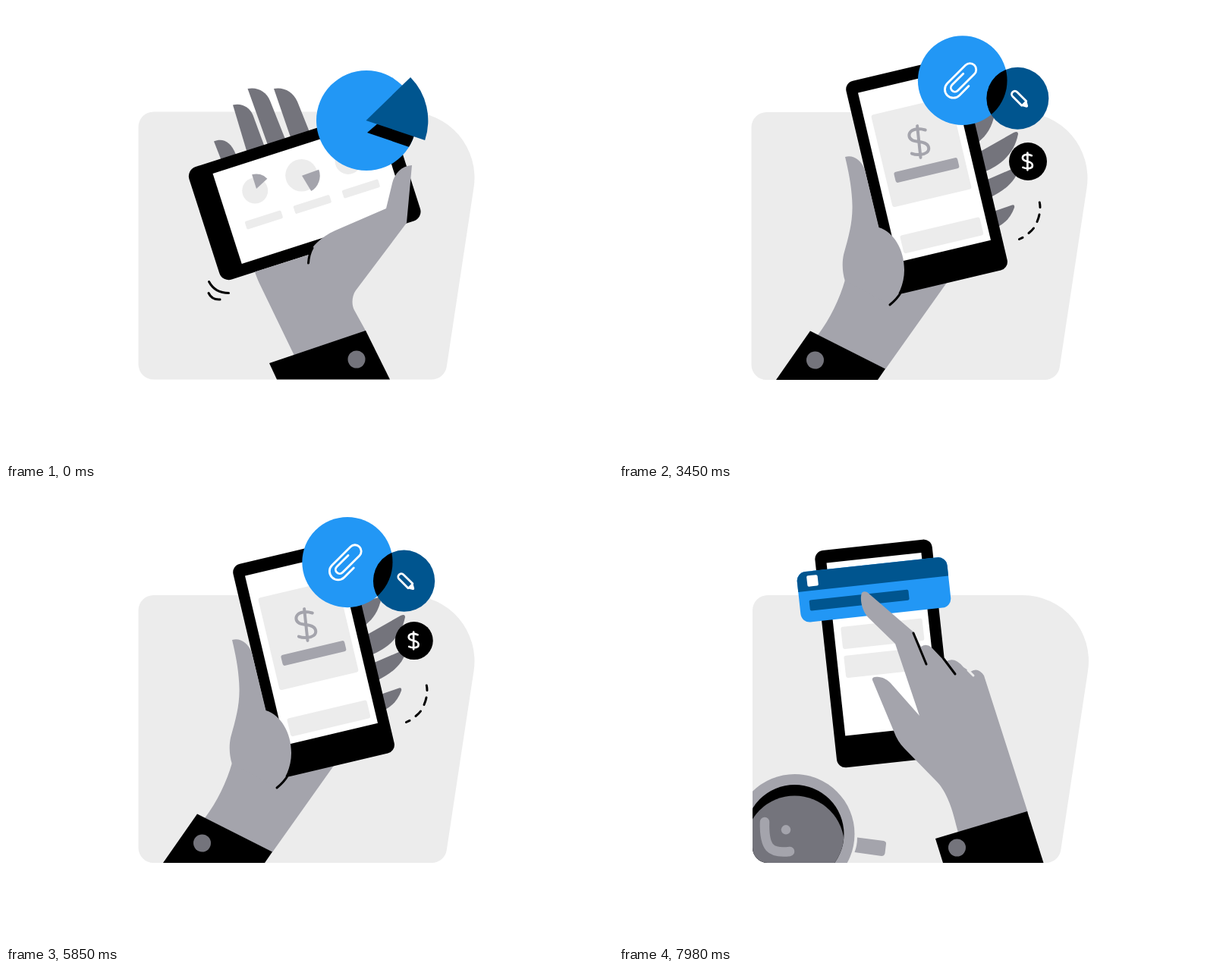
Recreate the animation shown at these times as an HTML page. Size 800 by 600 pixels, loop 8 s.

```html
<!DOCTYPE html>
<html lang="en">
<head>
<meta charset="utf-8">
<title>Hands and phones</title>
<style>
  html, body { margin: 0; width: 100%; height: 100%; overflow: hidden; background: #fff; }
  svg { display: block; width: 100%; height: 100%; }
  .line { fill: none; stroke: #000; stroke-width: 3; stroke-linecap: round; stroke-linejoin: round; }
  .icon { fill: none; stroke: #fff; stroke-width: 2.8; stroke-linecap: round; stroke-linejoin: round; }
  .pale { fill: #ececec; }
  .skin { fill: #a4a4ac; }
  .dark { fill: #74747c; }
  .blue { fill: #2297f5; }
  .navy { fill: #00558f; }
  .white { fill: #fff; }
  #shine { stroke: #a4a4ac; stroke-width: 12.5; }
</style>
</head>
<body>
<svg viewBox="0 0 800 600">
  <defs>
    <path id="plate" d="M194.5 139.5H530.5A87 87 0 0 1 616.5 239.6L580.8 475.5A20 20 0 0 1 561 492.5H194.5A20 20 0 0 1 174.5 472.5V159.5A20 20 0 0 1 194.5 139.5Z"/>
    <g id="phone">
      <rect x="-14.6" y="-17" width="155.3" height="288" rx="11.5"/>
      <rect class="white" width="125.6" height="229.4"/>
    </g>
    <path id="dollar" d="M10 -14.5C5 -16.5 2 -17 -1 -17C-8 -17 -12 -13.5 -12 -9C-12 -3 -6 -1.5 0 0C7 1.5 12 4 12 9.5C12 14.5 7 17 0 17C-4 17 -7 16.5 -11 14.5M0 -21V21"/>
    <clipPath id="pieClip"><circle id="pieClipDisc"/></clipPath>
    <clipPath id="bubbleClip"><circle id="bubbleClipDisc"/></clipPath>
    <clipPath id="cupClip"><use href="#plate" x="1.5" y=".5"/></clipPath>
    <clipPath id="drinkClip"><circle cx="231.5" cy="455" r="65"/></clipPath>
  </defs>

  <g id="scene0">
    <use href="#plate" class="pale"/>
    <g class="dark">
      <path d="M274 178.5C284 174 296 177 303 196L284 204Z"/>
      <path d="M299 130.5C310 127.5 321 133 325.5 144L341 186L318 194Z"/>
      <path d="M318.5 109C332 106.500 343 113 348 125L369 178L346 186Z"/>
      <path d="M353 109C366 106.5 378 113 384 126L400 166L376 176Z"/>
    </g>
    <g transform="translate(237.5 216) rotate(-17.8)">
      <rect width="278" height="156" rx="13"/>
      <rect class="white" x="31.8" y="15.5" width="228" height="125"/>
      <g class="pale">
        <rect x="52.3" y="88.7" width="50" height="11" rx="2"/>
        <rect x="119.4" y="88.7" width="50" height="11" rx="2"/>
        <rect x="186.7" y="88.7" width="50" height="11" rx="2"/>
      </g>
    </g>
    <circle id="mini1" class="pale"/>
    <circle id="mini2" class="pale"/>
    <circle id="mini3" class="pale"/>
    <path id="slice1" class="skin"/>
    <path id="slice2" class="skin"/>
    <path class="skin" d="M535 210C521 211 512 221 509 234L501 267L434 296C414 305 402 318 399.5 328L328 350.5C330 357 333 364 337 372L380 461L475 430L459 401C455 393 456 382 461 375L528 286Z"/>
    <path class="line" d="M398.5 339C399 331 400.5 325 404 319"/>
    <path d="M347 471L474 428L506 492.5H357Z"/>
    <circle class="dark" cx="462" cy="466" r="11.5"/>
    <path class="line" d="M267.5 363.5C273 374 282 378.5 293.5 378.5M267 378.5C270 385 275 387.5 282 387"/>
    <circle id="pie" class="blue"/>
    <path id="hole" clip-path="url(#pieClip)"/>
    <path id="slice" class="navy"/>
  </g>

  <g id="scene1">
    <use href="#plate" y=".5" class="pale"/>
    <g class="dark">
      <path d="M465 150L495 142C492 160 484 171 474 179Z"/>
      <path d="M476 192L520 167Q526 164 526 169C521 194 505 209 480 219.500Z"/>
      <path d="M483 230L527 211C526 229 508 244 488 253Z"/>
      <path d="M495 270.5L518 262.5Q522 261.500 521 266C517 277 510 286 498 292Z"/>
    </g>
    <path class="skin" d="M298 361C291 386 278 413 262 434L351 479L434 362L370 330Z"/>
    <g transform="translate(315 114.5) rotate(-13.3)">
      <use href="#phone"/>
      <rect class="pale" x="9.8" y="32.6" width="107" height="125" rx="3"/>
      <rect class="skin" x="21.5" y="112.8" width="86" height="14.5" rx="3"/>
      <rect class="pale" x="10.2" y="196" width="108" height="24.5" rx="3"/>
    </g>
    <use href="#dollar" transform="translate(395.3 179) rotate(-6)" class="line" style="stroke:#a4a4ac;stroke-width:4"/>
    <path class="skin" d="M298 199C309 196 319 203 324 216L342.5 292C362 298 376 321 376 348C376 367 368 384 357 394L298 363C294 350 294 338 296 328C303 303 308 285 307.5 263C307 240 303 220 298 199Z"/>
    <path class="line" d="M357 394Q366 387 372 377"/>
    <path d="M252 428.5L351 478.5L341 493H207Z"/>
    <circle class="dark" cx="258.5" cy="467" r="11.5"/>
    <path class="line" d="M527.5 307.5L532 305.3M540 299.5Q544 296.5 546.5 293M551 284.5Q553 280 554 275M555 265.5Q555 262 554.3 259"/>
    <circle id="big" class="blue"/>
    <circle id="mid" class="navy"/>
    <circle id="overlap" clip-path="url(#bubbleClip)"/>
    <circle id="small"/>
    <path id="clip" class="icon" d="M13 -1.5V16A11.25 11.25 0 0 1 -9.5 16V-18A8.25 8.25 0 0 1 7 -18V13A5.35 5.35 0 0 1 -3.7 13V-8"/>
    <g id="pen">
      <path class="icon" d="M-4.2 9V-8A4.2 4.2 0 0 1 4.2 -8V9"/>
      <path class="white" d="M-5.5 8H5.5L1.5 15Q0 17 -1.5 15Z"/>
    </g>
    <use id="cash" href="#dollar" class="icon" style="stroke-width:5"/>
  </g>

  <g id="scene2">
    <use href="#plate" x="1.5" y=".5" class="pale"/>
    <g clip-path="url(#cupClip)">
      <circle class="skin" cx="231.5" cy="455" r="79"/>
      <circle cx="231.5" cy="455" r="65"/>
      <circle class="dark" cx="231.5" cy="470" r="65.5" clip-path="url(#drinkClip)"/>
      <path id="shine" class="line"/>
      <circle id="dot" class="skin" r="6.2"/>
    </g>
    <path class="skin" d="M314 459.5L349 464Q352.5 465 352 468L350.5 480.5Q349.5 484 346 484L310.5 479Q314 470 314 459.5Z"/>
    <path id="steam1" class="line" d="M214 342Q201 352 214 362"/>
    <path id="steam2" class="line" d="M236.5 347.5Q237 351.5 241.5 354.5"/>
    <g transform="translate(273.5 97.5) rotate(-6.2)">
      <use href="#phone"/>
      <rect class="pale" x="9.3" y="86" width="108" height="29.5" rx="3"/>
      <rect class="pale" x="9.3" y="124.2" width="108" height="29.5" rx="3"/>
    </g>
    <g id="card">
      <rect class="blue" x="-99.5" y="-33.4" width="199" height="66.8" rx="12"/>
      <path class="navy" d="M-99.5 -7.7V-21.4A12 12 0 0 1 -87.5 -33.4H87.5A12 12 0 0 1 99.5 -21.4V-7.7Z"/>
      <rect class="white" x="-86.5" y="-27.8" width="14.5" height="14.5" rx="2"/>
      <rect class="navy" x="-86.5" y="4.6" width="131.5" height="14" rx="2"/>
    </g>
    <path class="skin" d="M320 137Q322 134 327 136L388 188.5L398 208Q405 203 412 209L430 228Q442 220 454 235L463 241Q473 234 481 246L539 427L447 453C443 440 441 426 433 408C428 397 424 391 418 385L376 342Q367 333 362 319L334 252C333 248 337 247 343 248C350 249 354 252 358 256L396 299L364 204L328 169C320 160 317 145 320 137Z"/>
    <path class="line" d="M388 190L405 231M428 224L443 244"/>
    <path class="line" d="M460 239L467 246" style="stroke:#ececec"/>
    <path d="M417 461L538 425L559.5 493H427Z"/>
    <circle class="dark" cx="445.5" cy="473" r="11.5"/>
  </g>
</svg>
<script>
const LOOP = 8000, SCENE = 3000;
const el = id => document.getElementById(id);
const set = (id, attrs) => { for (const k in attrs) el(id).setAttribute(k, attrs[k]); };
const disc = (id, cx, cy, r) => set(id, { cx, cy, r });
const place = (id, x, y, scale, turn) =>
  set(id, { transform: `translate(${x} ${y}) rotate(${turn}) scale(${scale})` });

// Progress from 0 to 1 over a stretch of time, plain or eased.
const part = (t, from, length) => Math.max(0, Math.min(1, (t - from) / length));
const ease = p => (1 - Math.cos(Math.PI * p)) / 2;

// Pie slice with its apex at x, y, centred on the angle mid (degrees).
function wedge(id, x, y, r, mid, span) {
  const at = deg => {
    const a = deg * Math.PI / 180;
    return `${x + r * Math.cos(a)} ${y + r * Math.sin(a)}`;
  };
  set(id, { d: `M${x} ${y}L${at(mid - span / 2)}A${r} ${r} 0 0 1 ${at(mid + span / 2)}Z` });
}

// In the first two scenes everything sways once per scene: c and s are the cosine and sine of that cycle.
function drawPie(t, c, s) {
  const x = 472 + 3 * c - 2 * s, y = 148.3 + 2.7 * c + 2.6 * s, r = 65.4 + .6 * c + 1.3 * s;
  disc("pie", x, y, r);
  disc("pieClipDisc", x, y, r);
  wedge("hole", x + 5.9 - 4.9 * c, y + 21.2 - 5.2 * c, 95, -11, 52.2 + 7.4 * c - 1.9 * s);
  wedge("slice", x - 1.9 + 1.4 * c - 3 * s, y + 3 * s, r * 1.24, -10.2 - 2.7 * c, 50.1 + 12.6 * c);

  const swell = 1.2 * c + 2.6 * s;
  disc("mini1", 328.2, 243.5, 18.2 - swell);
  disc("mini2", 389.5, 223.3, 20.1 + swell);
  disc("mini3", 451, 204.5, 18.6 - swell);
  wedge("slice1", 329.3 + .7 * c, 242.2 - 1.2 * c, 21.2 - 1.6 * c, -82.6 + 7.4 * c, 47.1 + 17.4 * c);
  wedge("slice2", 390.8 - .8 * c, 223.8, 22.3 + 1.4 * c, 21.8 - 2.3 * c, 106 - 27 * c);
}

function drawBubbles(t, c, s) {
  const big = [450.7 + 2.5 * s, 99.7 - 3.2 * c + .4 * s, 59.4 - .7 * s];
  const mid = [526.7 - 2.2 * c, 122.6 - 1.5 * c, 40.7 + .3 * s];
  const small = [541 - 3.4 * c, 203.1 - 2 * c + 3.8 * s, 25];
  disc("big", ...big);
  disc("bubbleClipDisc", ...big);
  disc("mid", ...mid);
  disc("overlap", ...mid);
  disc("small", ...small);
  place("clip", big[0] - 2, big[1] - .7, big[2] / 59, 45);
  place("pen", mid[0] + 2, mid[1] + .3, mid[2] / 41, -45);
  place("cash", small[0] - .6, small[1], .54, 0);
}

function drawCard(t) {
  const rise = 1 - (1 - part(t, 400, 1100)) ** 2;
  const scale = .54 + .6 * ease(part(t, 410, 490)) - .14 * ease(part(t, 900, 600));
  place("card", 343.5 - 7.5 * rise, 147 - 14.2 * rise, scale, -6.2);

  const k = ease((t - 600) / 1380);
  set("shine", { d: `M${193 - k} ${447 - 8 * k}C${192 - k} ${470 + 4 * k} ${205 - 5 * k} ${488 - 7 * k} ${235 - 10 * k} ${476 + 2 * k}` });
  set("dot", { cx: 229.5 - 9.5 * k, cy: 455.5 - 6.2 * k });
  set("steam1", { opacity: 1 - part(t, 460, 360) });
  set("steam2", { opacity: 1 - part(t, 340, 360) });
}

const draws = [drawPie, drawBubbles, drawCard];

function render(time) {
  const now = Math.floor(time / SCENE), t = time % SCENE, a = 2 * Math.PI * t / SCENE;
  draws.forEach((_, i) => { el("scene" + i).style.display = i === now ? "" : "none"; });
  draws[now](t, Math.cos(a), Math.sin(a));
}

const start = performance.now();
function tick() {
  render((performance.now() - start) % LOOP);
  requestAnimationFrame(tick);
}
tick();
</script>
</body>
</html>
```
